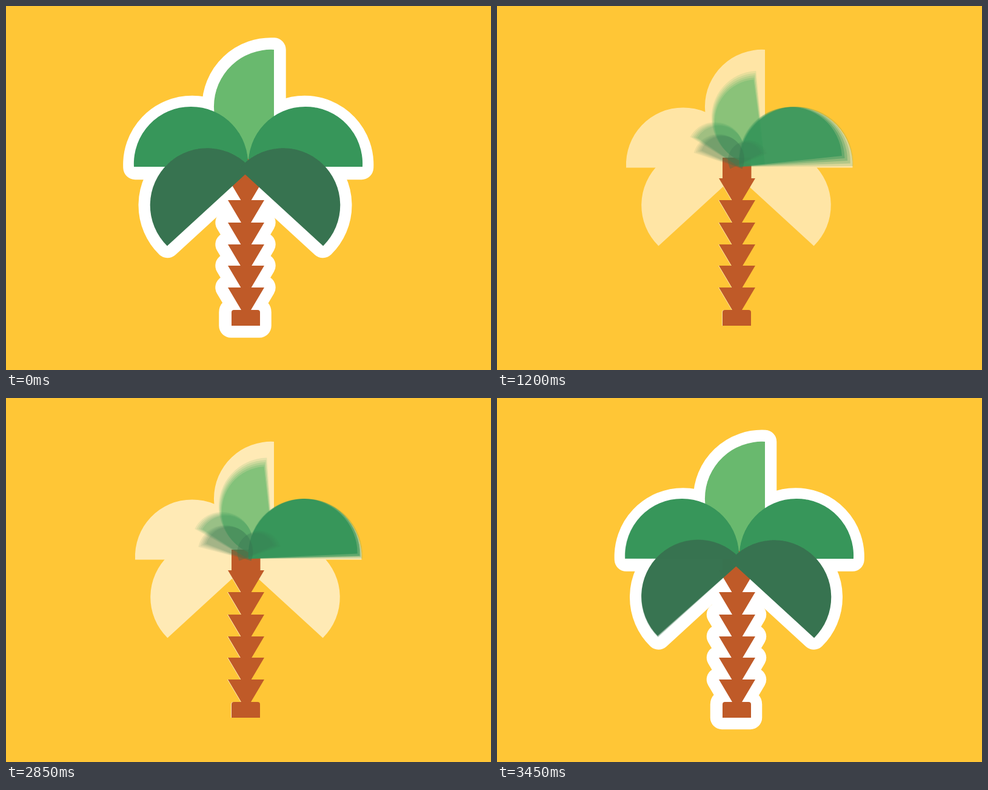
An HTML page that plays this animation: 800x600 px, repeating every 3480 ms.

```html
<!DOCTYPE html>
<html lang="en">
<head>
<meta charset="utf-8">
<title>Palm</title>
<style>
html, body { margin: 0; width: 100%; height: 100%; overflow: hidden; background: #ffc636; }
svg { display: block; width: 800px; height: 600px; }
.leaf { isolation: isolate; }
.leaf use { mix-blend-mode: plus-lighter; }
</style>
</head>
<body>
<svg viewBox="0 0 800 600">
  <defs><path id="blade" d="M0 0A94.13 94.13 0 1 1 188 0Z"/></defs>
  <g id="sticker" fill="#fff" stroke="#fff" stroke-linejoin="round"></g>
  <g id="trunk" fill="#bf5a28"></g>
  <g id="crown"></g>
</svg>
<script>
const LOOP = 3480, STEP = 30, SAMPLES = 5, SHUTTER = 12;
const $ = id => document.getElementById(id);
const clamp = x => Math.min(1, Math.max(0, x));

function add(parent, tag, attrs) {
  const el = document.createElementNS('http://www.w3.org/2000/svg', tag);
  for (const key in attrs) el.setAttribute(key, attrs[key]);
  return parent.appendChild(el);
}

function bounce(x) {
  x = clamp(x);
  const k = 7.5625, d = 2.75;
  if (x < 1 / d) return k * x * x;
  if (x < 2 / d) return k * (x - 1.5 / d) ** 2 + 0.75;
  if (x < 2.5 / d) return k * (x - 2.25 / d) ** 2 + 0.9375;
  return k * (x - 2.625 / d) ** 2 + 0.984375;
}

// Trunk pieces from the ground up, each growing from its lower edge
const pieces = [
  { d: 'M372 527V505q0-4 4-4h39q4 0 4 4V527Z', bottom: 527 },
  ...[464, 428, 393, 357, 320, 284].map(y => ({ d: `M366 ${y}H426L404 ${y + 37}H388Z`, bottom: y + 37 })),
  { d: 'M372 250H419.5V285H372Z', bottom: 285 }
];

// x, y: tip; flip: mirrored; angle: resting pose; swing: extra turn while folded; dx, dy: shift of the white backing
const leaves = [
  { x: 442, y: 260, flip: 1, angle: -90, swing: -30, start: 2586, span: 800, color: '#67b76a', dx: 0, dy: 0 },
  { x: 399, y: 265, flip: -1, angle: 0, swing: -63, start: 2641, span: 808, color: '#349259', dx: 2, dy: 1.5 },
  { x: 400, y: 265, flip: 1, angle: 0, swing: -63, start: 2595, span: 700, color: '#349259', dx: -1.5, dy: 1.5 },
  { x: 404.5, y: 268.5, flip: -1, angle: 42.5, swing: -110, start: 2653, span: 806, color: '#36734d', dx: 0.5, dy: 0 },
  { x: 384.5, y: 268.5, flip: 1, angle: 42.5, swing: -100, start: 2690, span: 735, color: '#36734d', dx: -0.5, dy: 0 }
];

const pose = (leaf, v, dx = 0, dy = 0) =>
  `translate(${leaf.x + dx} ${leaf.y + dy}) scale(${leaf.flip} 1) rotate(${leaf.angle + leaf.swing * (1 - v)}) scale(${v})`;

for (const piece of pieces) {
  add($('sticker'), 'path', { d: piece.d, transform: 'translate(-1 0)' });
  piece.el = add($('trunk'), 'path', { d: piece.d });
}
for (const leaf of leaves) {
  add($('sticker'), 'use', { href: '#blade', transform: pose(leaf, 1, leaf.dx, leaf.dy) });
  leaf.el = add($('crown'), 'g', { class: 'leaf', fill: leaf.color });
  leaf.blades = Array.from({ length: SAMPLES }, () =>
    add(leaf.el, 'use', { href: '#blade', opacity: 1 / SAMPLES }));
}

// The exit is the entrance run backwards
function entranceTime(t) {
  if (t < STEP) return LOOP + t;
  return t < 2040 ? 2843 + (1200 - t) * 1.02 : t;
}

function draw(u) {
  $('sticker').setAttribute('opacity', clamp((u - 2793) / 90));
  $('sticker').setAttribute('stroke-width', 41 * bounce((u - 2850) / 720));

  pieces.forEach((piece, i) => {
    const s = clamp((u - 2255 - 55 * i) / 90);
    piece.el.setAttribute('transform', `translate(396 ${piece.bottom}) scale(${s}) translate(-396 ${-piece.bottom})`);
  });

  for (const leaf of leaves) {
    const grown = time => bounce((time - leaf.start) / leaf.span);
    leaf.el.setAttribute('opacity', grown(u));
    leaf.blades.forEach((blade, i) => {
      const offset = (i / (SAMPLES - 1) - 0.5) * SHUTTER;
      blade.setAttribute('transform', pose(leaf, grown(u + offset)));
    });
  }
}

const begin = performance.now();
function tick() {
  const t = (performance.now() - begin) % LOOP;
  draw(entranceTime(Math.floor(t / STEP) * STEP));
  requestAnimationFrame(tick);
}
tick();
</script>
</body>
</html>
```
